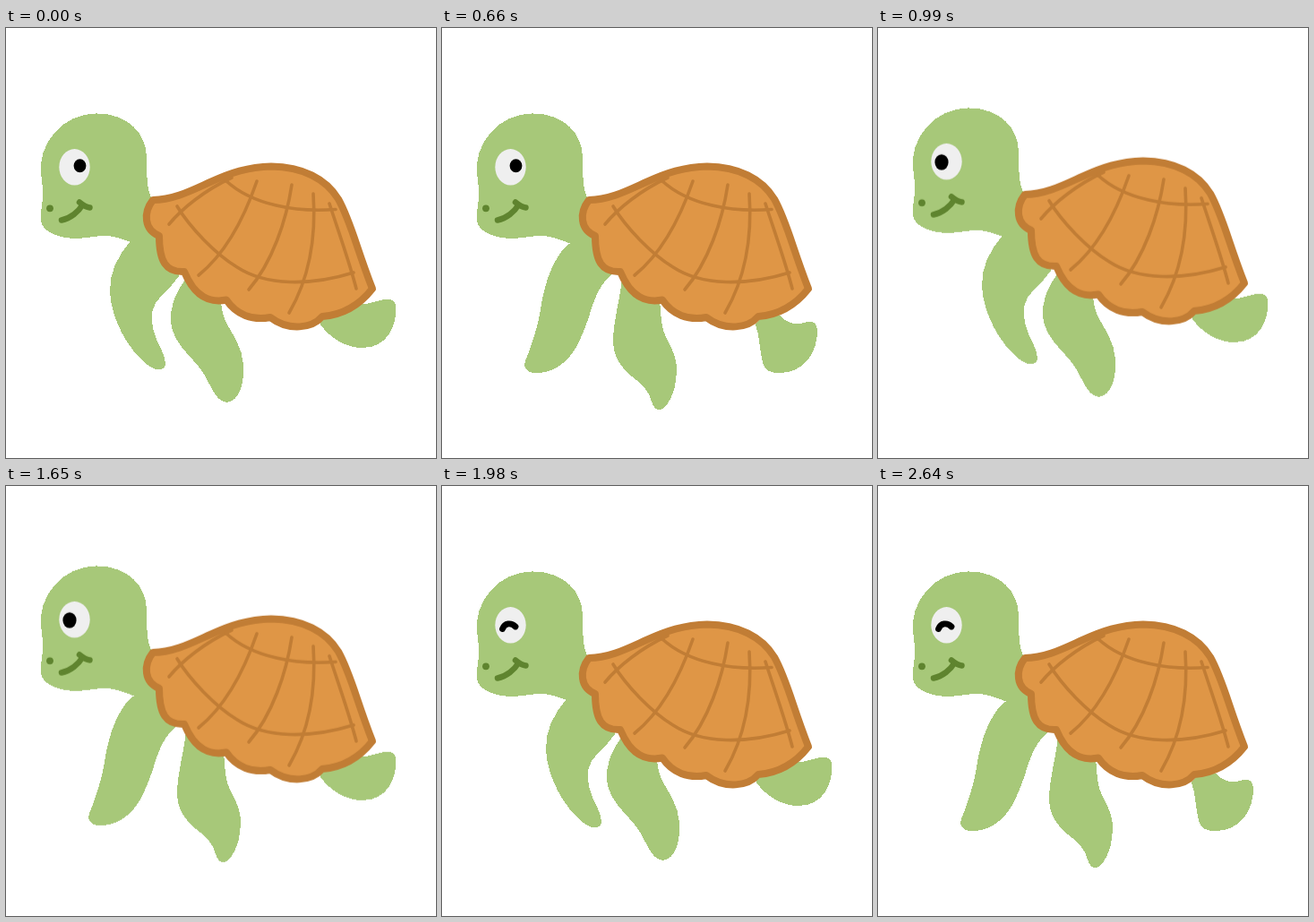
Write an HTML page that moves like this. It is 480x480 px and loops after 2.97 s.

```html
<!DOCTYPE html>
<html lang="en">
<head>
<meta charset="utf-8">
<title>Turtle</title>
<style>
html, body { margin: 0; width: 100%; height: 100%; overflow: hidden; background: #fff; }
svg { display: block; width: 100%; height: 100%; }

.skin { fill: #a7c879; shape-rendering: crispEdges; }
.shell { fill: #df9646; stroke: #c17d35; stroke-width: 8; stroke-linejoin: round; }
.seams { fill: none; stroke: #c17d35; stroke-width: 3.6; stroke-linecap: round; }
.smile { fill: none; stroke: #5f842f; stroke-width: 6.5; stroke-linecap: round; stroke-linejoin: round; }
.wink { fill: none; stroke: #000; stroke-width: 6.8; stroke-linecap: round; }

/* One beat is 330 ms: three beats per stroke, nine per loop */
.turtle { animation: bob 2970ms step-end infinite; }
.pose, .look { animation: third 990ms step-end infinite; }
.look { animation-duration: 2970ms; }
.pose.b { animation-delay: -660ms; }
.pose.c { animation-delay: -330ms; }
.look.left { animation-delay: -1980ms; }
.look.shut { animation-delay: -990ms; }
.tail-a { animation: tail-a 2970ms step-end infinite; }
.tail-c { animation: tail-c 2970ms step-end infinite; }

@keyframes third {
  0% { visibility: visible; }
  33.3333%, 100% { visibility: hidden; }
}
@keyframes bob {
  0%, 22.2222%, 44.4444%, 66.6666%, 100% { transform: translateY(0); }
  11.1111%, 33.3333%, 55.5555% { transform: translateY(-6.2px); }
}
@keyframes tail-a {
  0%, 33.3333%, 55.5555% { visibility: visible; }
  11.1111%, 44.4444%, 77.7777%, 100% { visibility: hidden; }
}
@keyframes tail-c {
  0%, 33.3333%, 100% { visibility: hidden; }
  22.2222%, 88.8888% { visibility: visible; }
}
</style>
</head>
<body>
<svg viewBox="0 0 480 480">
  <g class="turtle">
    <g class="skin">
      <g class="pose a">
        <path d="M138 239C124 255 115 275 116 295C118 325 135 358 158 376C165 382 176 384 178 376C178 368 174 360 169 350C162 334 160 318 167 307C174 297 184 290 193 277L180 235Z"/>
        <path d="M200 281C188 297 183 312 184 329C187 352 206 366 215 378C227 391 231 416 246 418C261 417 266 396 265 376C264 357 253 342 247 331C241 320 241 313 239 300L215 280Z"/>
      </g>
      <g class="pose b">
        <path d="M144 240C129 251 107 277 106 303C106 325 119 338 119 355C119 371 115 378 116 387C117 396 127 395 134 393C148 389 154 370 154 354C154 340 151 330 152 318C153 305 158 295 165 295C172 298 168 317 172 332C175 355 186 369 207 376C229 384 243 401 264 406C276 408 284 398 282 386C280 375 266 367 256 357C244 344 240 328 241 305L200 265L180 235Z"/>
        <path d="M348 329C357 354 373 377 396 377C416 377 425 358 425 335C425 325 419 322 410 322C400 323 393 321 384 317L365 310Z"/>
      </g>
      <g class="pose c">
        <path d="M141 241C123 258 115 285 111 308C108 330 100 355 94 369C90 377 93 385 104 385C124 386 144 372 154 348C163 330 166 312 173 297C178 287 182 282 189 275L180 235Z"/>
        <path d="M201 281C199 300 192 325 191 345C190 366 199 378 212 389C224 398 231 405 234 417C237 427 243 429 250 422C259 411 262 395 262 378C260 358 249 349 246 333C244 322 244 315 243 303L215 280Z"/>
      </g>
      <path class="tail-a" d="M351 331C362 346 379 357 398 357C425 357 437 333 435 310C434 303 429 302 422 303C414 305 407 307 402 308L380 310L350 315Z"/>
      <path class="tail-c" d="M350 331C355 345 354 358 358 374C361 386 374 386 386 384C406 380 419 361 419 338C419 328 412 326 404 329C393 332 385 329 377 321L365 312Z"/>
      <path d="M102 95.5C84 95 66 103 54 117C42 131 38 147 39 160C40 175 42 180 41 190C40 200 38 208 39 215C40 225 54 234 76 235C92 235 105 230 120 233C130 235 136 238 144 241L190 260L190 200L164 192C158 184 157 172 157 145C157 118 136 95.5 102 95.5Z"/>
    </g>

    <path class="shell" d="M164 192C187 192 208 181 228 172C250 162 270 155 296 154.5C331 155 357 168 371 191C385 216 391 245 409 291C398 305 380 320 353 322C342 335 316 339 295 323C275 327 257 320 246 303.5C228 307 211 301 199 272C178 273 171 260 171 232C154 225 153 206 164 192Z"/>
    <g class="seams">
      <path d="M182 219C197 201 222 181 252 167"/>
      <path d="M245 170C275 198 325 206 368 202.5"/>
      <path d="M191 199C205 222 233 252 258 267C290 288 340 288 388 273"/>
      <path d="M280 171C268 206 247 250 215 276"/>
      <path d="M319 175C313 215 297 262 271 292"/>
      <path d="M343 185C346 228 341 275 316 318"/>
      <path d="M361 196C372 230 383 260 391 291"/>
    </g>

    <ellipse cx="76.5" cy="155.3" rx="17.2" ry="20.2" fill="#efefef"/>
    <ellipse class="look" cx="82.5" cy="153.7" rx="6.9" ry="7.5"/>
    <ellipse class="look left" cx="71" cy="156" rx="7.6" ry="8.8"/>
    <path class="look shut wink" d="M67.5 159.5C70 153 77 152 82 157"/>

    <circle cx="49" cy="201.3" r="3.9" fill="#5f842f"/>
    <path class="smile" d="M62 214.5C72 212.5 81 205 85 198"/>
    <path class="smile" d="M82 194.5C85 197 89 200 93.5 200.5"/>
  </g>
</svg>
</body>
</html>
```
